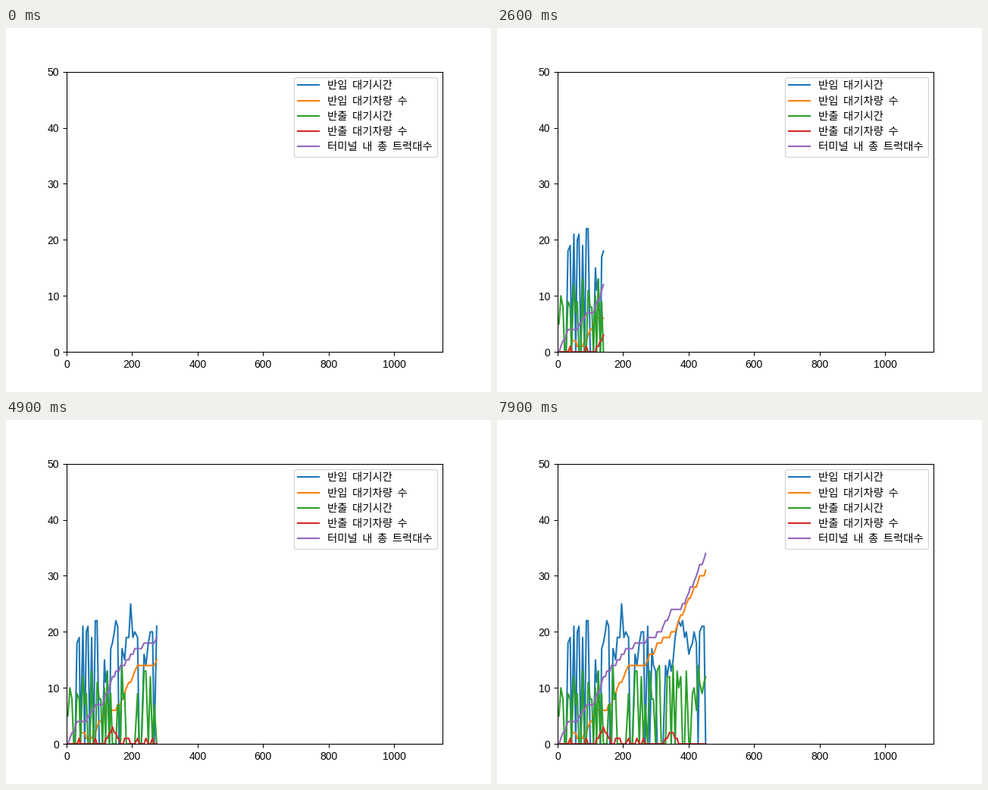
Write a matplotlib script that moves like this. It is 640x480 px and loops after 8000 ms.

```python
import matplotlib.pyplot as plt
import numpy as np
from matplotlib.animation import FuncAnimation
from matplotlib.patches import FancyBboxPatch

W, H, DPI = 640, 480, 100
FRAMES, STEP_MS = 80, 100
PX = 72 / DPI
TICK_FONT, KEY_FONT = "Liberation Sans", "Noto Sans CJK JP"

plt.rcParams["font.family"] = TICK_FONT

N = FRAMES - 1
rng = np.random.default_rng(7)
step = np.arange(N)


def through(*points):
    """Straight runs between (step, value) points."""
    return np.interp(step, *zip(*points))


def bump(center, height, reach):
    return height * np.clip(1 - abs(step - center) / reach, 0, 1)


def waits(level, spread, idle_chance):
    """Whole-minute waits around a level, falling to zero when idle."""
    values = np.rint(level + rng.uniform(-spread, spread, N))
    values[rng.random(N) < idle_chance] = 0
    values[:2] = 0
    return values


# Uneven sampling times, about 5.7 minutes apart
times = through((0, 4), (13, 77), (25, 141), (34, 183),
                (48, 275), (56, 323), (68, 394), (78, 452))
times[1:-1] += rng.uniform(-1.2, 1.2, N - 2)

total = np.rint(through((0, 0), (5, 4), (9, 4), (16, 7), (19, 7), (24, 11),
                        (27, 13), (33, 14), (36, 16), (43, 18), (51, 19),
                        (55, 20), (60, 24), (65, 24), (72, 29), (78, 34)))
in_trucks = np.rint(through((6, 0), (7, 2), (12, 1), (15, 2), (20, 6), (26, 6),
                            (32, 8), (39, 14), (46, 14), (50, 16), (56, 19),
                            (59, 19), (63, 21), (68, 25), (72, 28), (78, 31)))
out_trucks = np.rint(bump(6, 1, 1) + bump(15, 1, 1) + bump(25, 3, 5)
                     + bump(34, 1.4, 3) + bump(39, 1, 1) + bump(43, 1, 2)
                     + bump(46, 1, 1) + bump(60, 2.2, 5))

# Inbound trucks queue without a break in two busy spells
busy = ((step > 30) & (step < 40)) | ((step > 56) & (step < 73))
in_level = through((2, 13), (6, 20), (17, 22), (21, 13), (28, 22), (33, 14),
                   (36, 23), (41, 14), (48, 22), (53, 11), (60, 13),
                   (64, 22), (70, 17), (78, 21))
in_wait = waits(in_level, 2, np.where(busy, 0, 0.5))
out_wait = waits(10.5, 4.5, 0.4)
out_wait[:2] = 5, 10

series = [
    ("반입 대기시간", in_wait, 75),
    ("반입 대기차량 수", in_trucks, 96),
    ("반출 대기시간", out_wait, 116),
    ("반출 대기차량 수", out_trucks, 136),
    ("터미널 내 총 트럭대수", total, 156),
]

fig, ax = plt.subplots(figsize=(W / DPI, H / DPI), dpi=DPI)
fig.subplots_adjust(left=0.125, right=0.9, bottom=0.11, top=0.88)
ax.set_xlim(0, 1148)
ax.set_ylim(0, 50)

# Pixel-space layer for the legend
key = fig.add_axes([0, 0, 1, 1], zorder=2)
key.set_xlim(0, W)
key.set_ylim(H, 0)
key.axis("off")
key.add_patch(FancyBboxPatch((380.5, 65.5), 189, 105, mutation_scale=1,
                             boxstyle="round,pad=0,rounding_size=2.8",
                             fc=(1, 1, 1, 0.8), ec=(0.8, 0.8, 0.8, 0.8), lw=1))

lines = []
for i, (label, _, y) in enumerate(series):
    color = f"C{i}"
    lines.append(ax.plot([], [], color=color, lw=1.5)[0])
    key.plot([385, 413], [y, y], color=color, lw=1.5)
    key.text(424.4, y + 4.7, label.replace(" ", "  "), family=KEY_FONT,
             size=14.35 * PX, va="baseline")


def draw(n):
    for line, (_, values, _) in zip(lines, series):
        line.set_data(times[:n], values[:n])
    return lines


anim = FuncAnimation(fig, draw, frames=FRAMES, init_func=lambda: draw(0),
                     interval=STEP_MS, repeat=True, repeat_delay=0, blit=False)
plt.show()
```
